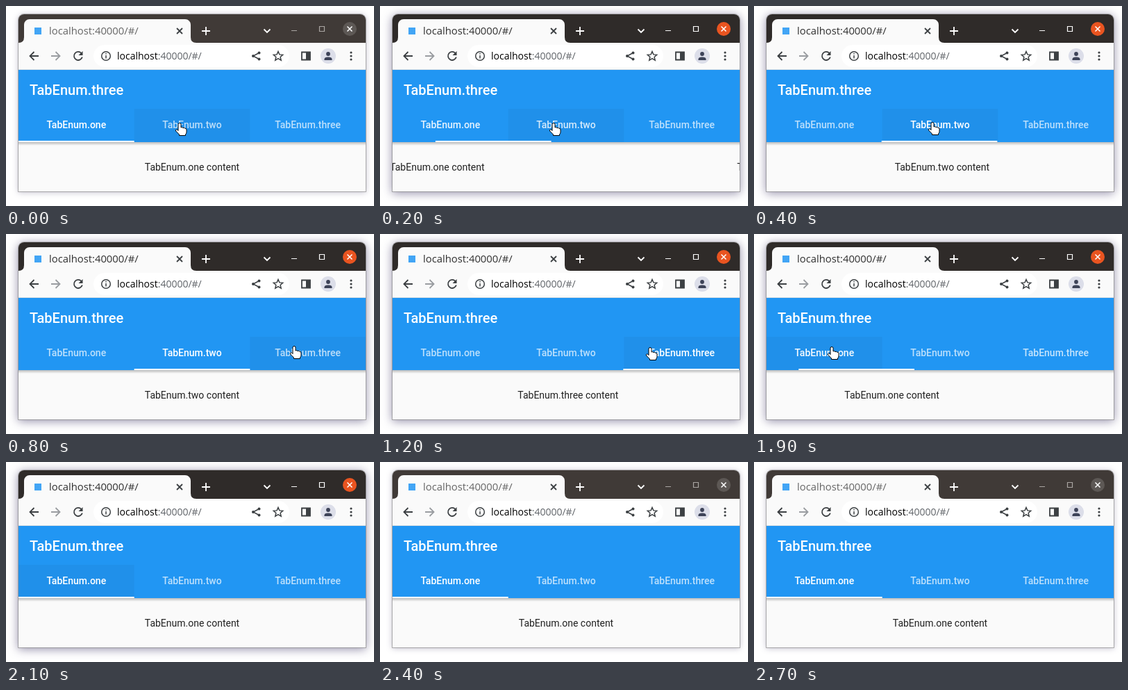
These frames come from a looping animation (530 px wide and 288 px high, 2800 ms). An HTML page:

```html
<!DOCTYPE html>
<html lang="en">
<head>
<meta charset="utf-8">
<title>Tab switching</title>
<style>
  html, body { margin: 0; width: 100%; height: 100%; overflow: hidden; background: #fff; }
  svg { display: block; }
  text { font: 14px Roboto, sans-serif; }
  .label { font-weight: 500; fill: #fff; text-anchor: middle; }
  .title { font-weight: 500; font-size: 20px; fill: #fff; }
  .page { fill: #212121; text-anchor: middle; }
  .chrome { font-family: "Open Sans", "Noto Sans", sans-serif; }
  .line { fill: none; stroke: #3c4043; stroke-width: 1.8; }
  .thin { stroke-width: 1.5; }
  .light { stroke: #fff; }
  #frame { --bar: #403a37; --tab: #666; --button: #aaa6a3; --close: #5d5855; --shade: drop-shadow(0 1px 4px rgba(40, 30, 80, .28)); }
  #frame.active { --bar: #2f2b29; --tab: #303030; --button: #fff; --close: #e95420; --shade: drop-shadow(0 2px 7px rgba(35, 25, 80, .5)); }
  #backdrop { fill: #fafafa; filter: var(--shade); }
  #bar { fill: var(--bar); }
</style>
</head>
<body>
<svg width="530" height="288" viewBox="0 0 530 288">
  <defs>
    <clipPath id="window"><path d="M18 267V20a8 8 0 0 1 8-8H510a8 8 0 0 1 8 8V267z"/></clipPath>
    <path id="outline" d="M17.500 267.500V20a8.500 8.500 0 0 1 8.500-8.500H510a8.500 8.500 0 0 1 8.500 8.500V267.500z"/>
    <linearGradient id="fall" x2="0" y2="1">
      <stop stop-opacity=".25"/><stop offset="1" stop-opacity="0"/>
    </linearGradient>
  </defs>
  <g id="frame">
    <use id="backdrop" href="#outline"/>
    <use href="#outline" fill="none" stroke="#000" stroke-opacity=".3"/>
    <g clip-path="url(#window)">
      <g id="pages"></g>
      <rect x="18" y="196" width="500" height="5" fill="url(#fall)"/>

      <!-- title bar -->
      <rect id="bar" x="18" y="12" width="500" height="42"/>
      <path d="M18 53q8 0 8-8V27a8 8 0 0 1 8-8H258a8 8 0 0 1 8 8V45q0 8 8 8z" fill="#fafafa"/>
      <rect x="41" y="31" width="10" height="10" fill="#42a5f5"/>
      <text class="chrome" x="62" y="41" style="font-size:14.8px;fill:var(--tab)">localhost:40000/#/</text>
      <path class="line" d="M246 32l8 8m0-8l-8 8"/>
      <path class="line light" d="M282 36h12m-6-6v12M371.500 33.500l4.500 4.500 4.500-4.500"/>
      <path class="line" style="stroke:var(--button);stroke-width:1.200" d="M411 35.500h8M451.500 29.500h7v7h-7z"/>
      <circle cx="495" cy="33" r="10" style="fill:var(--close)"/>
      <path class="line light thin" d="M491.500 29.500l7 7m0-7l-7 7"/>

      <!-- toolbar -->
      <rect x="18" y="53" width="500" height="38" fill="#fafafa"/>
      <rect x="18" y="91" width="500" height="1" fill="#dcdfe3"/>
      <rect x="126" y="56" width="282" height="32" rx="16" fill="#fff"/>
      <path class="line" d="M47 72H34.500m6-6l-6 6 6 6"/>
      <path class="line" style="stroke:#9a9da1" d="M65 72h12.500m-6-6l6 6-6 6"/>
      <path class="line" d="M108.500 68a6 6 0 1 0 1.300 5.500"/>
      <path d="M110.500 65v6h-6z" fill="#3c4043"/>
      <circle class="line thin" cx="144" cy="72" r="6.300"/>
      <path class="line thin" d="M144 71v4.500m0-7.500v1.500"/>
      <text class="chrome" x="160" y="77" fill="#000">localhost<tspan fill="#5f6368">:40000/#/</tspan></text>
      <path class="line thin" d="M364.500 67.500l-8.500 4.500 8.500 4.500"/>
      <g fill="#3c4043">
        <circle cx="364.500" cy="67.500" r="2"/><circle cx="356" cy="72" r="2"/><circle cx="364.500" cy="76.500" r="2"/>
        <circle cx="497" cy="67" r="1.600"/><circle cx="497" cy="72" r="1.600"/><circle cx="497" cy="77" r="1.600"/>
      </g>
      <path class="line thin" d="M392 65.500l1.900 4.400 4.800.4-3.600 3.200 1.100 4.700-4.200-2.500-4.200 2.500 1.100-4.700-3.600-3.200 4.800-.4z"/>
      <path class="line" d="M426 66.500h12v11h-12z"/>
      <path d="M432 66h6v12h-6z" fill="#3c4043"/>
      <circle cx="464" cy="72" r="11" fill="#dcdee9"/>
      <path d="M458.500 78v-1.500q0-3 5.500-3t5.500 3V78z" fill="#3d4358"/>
      <circle cx="464" cy="69" r="2.900" fill="#3d4358"/>

      <!-- app bar -->
      <rect x="18" y="92" width="500" height="104" fill="#2196f3"/>
      <text class="title" x="34" y="128">TabEnum.three</text>
      <rect id="hover" y="148" width="166.670" height="48" fill-opacity=".04"/>
      <g id="labels"></g>
      <rect id="indicator" y="194" width="166.670" height="2" fill="#fff"/>
    </g>
  </g>
  <path id="hand" fill="#fff" stroke="#000" stroke-linejoin="round"
    d="M-2 11.500V2.500a2 2 0 0 1 4 0V7q1.500-1 3 .5 1.500-.7 2.700.6 2.300-.2 2.300 2V13.500q0 2-1.500 3.500V18.500H-.5V17L-5.400 12q-.8-1.800.8-2.200 1.300-.1 2.600 1.700z"/>
</svg>
<script>
const LOOP = 2800, STEP = 100, SLIDE = 300, LEFT = 18, WIDTH = 500, TAB = WIDTH / 3;
const names = ['one', 'two', 'three'];
const switches = [
  { at: 130, from: 0, to: 1 },
  { at: 930, from: 1, to: 2 },
  { at: 1730, from: 2, to: 0 },
];
// time, x, y of the fingertip
const pointer = [
  [0, 250, 168], [200, 250, 168], [400, 257, 167], [700, 408, 161], [800, 415, 161],
  [950, 404, 162], [1200, 389, 163], [1600, 155, 160], [1750, 112, 162],
];
const $ = id => document.getElementById(id);

function addText(parent, className, x, y, content) {
  const node = document.createElementNS('http://www.w3.org/2000/svg', 'text');
  node.setAttribute('class', className);
  node.setAttribute('x', x);
  node.setAttribute('y', y);
  node.textContent = content;
  return $(parent).appendChild(node);
}
const labels = names.map((name, i) => addText('labels', 'label', LEFT + TAB * (i + 0.5), 176, 'TabEnum.' + name));
const pages = names.map(name => addText('pages', 'page', LEFT + WIDTH / 2, 237, `TabEnum.${name} content`));

// cubic-bezier(.25, .1, .25, 1)
function ease(x) {
  if (x <= 0 || x >= 1) return Math.min(1, Math.max(0, x));
  const bezier = (s, a, b) => 3 * (1 - s) ** 2 * s * a + 3 * (1 - s) * s * s * b + s ** 3;
  let low = 0, high = 1;
  for (let i = 0; i < 20; i++) {
    const mid = (low + high) / 2;
    if (bezier(mid, 0.25, 0.25) < x) low = mid; else high = mid;
  }
  return bezier(low, 0.1, 1);
}

function pointerAt(t) {
  const next = pointer.findIndex(key => key[0] > t);
  if (next < 0) return pointer[pointer.length - 1].slice(1);
  const [t0, x0, y0] = pointer[next - 1], [t1, x1, y1] = pointer[next];
  const k = (t - t0) / (t1 - t0);
  return [x0 + (x1 - x0) * k, y0 + (y1 - y0) * k];
}

function draw(t) {
  const { at, from, to } = switches.findLast(s => s.at <= t) || { at: -SLIDE, from: 2, to: 0 };
  const k = ease((t - at) / SLIDE);
  const side = Math.sign(to - from);

  $('indicator').setAttribute('x', LEFT + TAB * (from + (to - from) * k));
  names.forEach((_, i) => {
    const weight = i === to ? k : i === from ? 1 - k : 0;
    labels[i].setAttribute('fill-opacity', 0.7 + 0.3 * weight);
    const shift = i === to ? side * (1 - k) : -side * k;
    pages[i].setAttribute('transform', `translate(${shift * WIDTH})`);
    pages[i].setAttribute('visibility', weight > 0 ? 'visible' : 'hidden');
  });

  const [x, y] = pointerAt(t);
  $('hand').setAttribute('transform', `translate(${x} ${y})`);
  $('hand').setAttribute('visibility', t < 2000 ? 'visible' : 'hidden');
  $('hover').setAttribute('x', LEFT + TAB * Math.floor((x - LEFT) / TAB));
  $('hover').setAttribute('visibility', t < 2400 ? 'visible' : 'hidden');
  $('frame').classList.toggle('active', t >= 100 && t < 2400);
}

function tick() {
  draw(Math.floor(performance.now() % LOOP / STEP) * STEP);
  requestAnimationFrame(tick);
}
tick();
</script>
</body>
</html>
```
